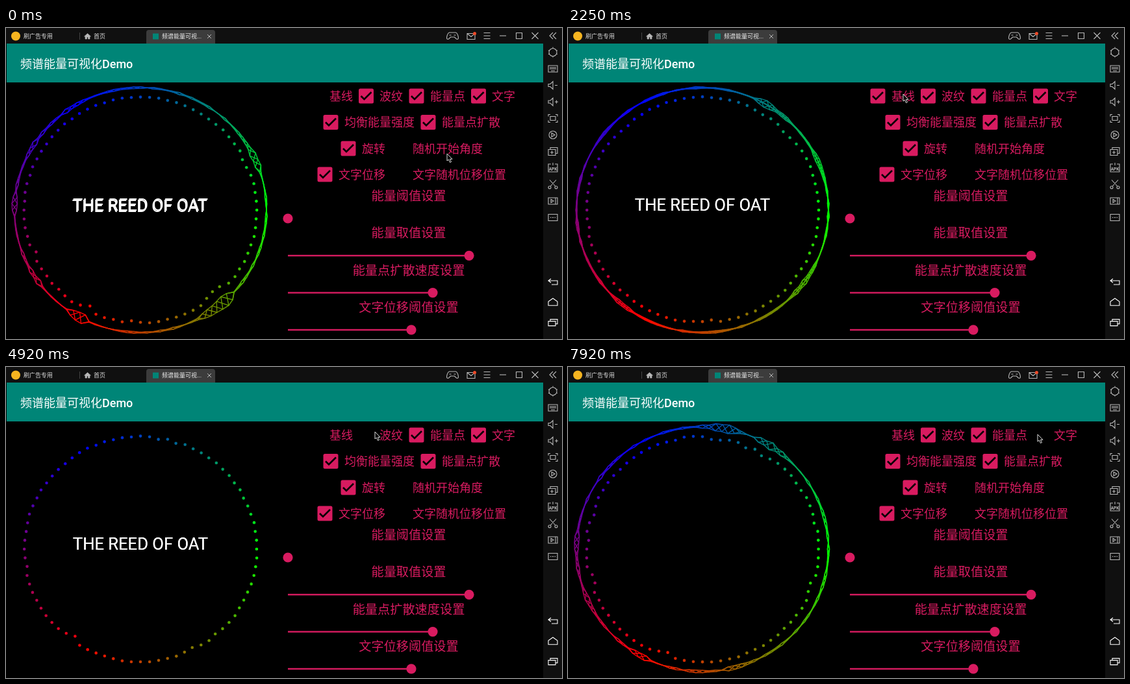
Animation of 856x480 px, one loop 8 s. Source, as an HTML page with a canvas:

```html
<!DOCTYPE html>
<html lang="zh-CN">
<head>
<meta charset="utf-8">
<title>频谱能量可视化Demo</title>
<style>
  html, body { margin: 0; width: 100%; height: 100%; overflow: hidden; background: #000; }
  canvas { display: block; width: 856px; height: 480px; }
</style>
</head>
<body>
<canvas id="stage" width="856" height="480"></canvas>
<script>
const ctx = document.getElementById('stage').getContext('2d');
const LOOP = 8000, STEP = 1000 / 12, BEAT = 1415, FIRST_BEAT = 1160;
const POINTS = 120, DOTS = 80, CX = 207, CY = 281;
const FONT = 'Roboto, "Noto Sans CJK SC", "Noto Sans CJK", sans-serif';
const PINK = '#d81b60', BAR = '#101010', PALE = '#b8b8b8';
const CAPTION = 'THE REED OF OAT';

const spectrum = ctx.createConicGradient(0, CX, CY);
['#0f0', '#f00', '#00f', '#0f0'].forEach((c, i) => spectrum.addColorStop(i / 3, c));

const between = (t, a, b) => t >= a && t < b;
const rnd = (a, b) => {
  const v = Math.sin(a * 12.9898 + b * 78.233) * 43758.5453;
  return v - Math.floor(v);
};

// 1 on each beat, fading quickly afterwards
function beatAt(step) {
  const phase = (step * STEP - FIRST_BEAT) / BEAT;
  return Math.exp(-8 * (phase - Math.floor(phase)));
}

// Sparse clustered peaks over a low hum, strongest near the bottom of the ring
function energy(step, i) {
  const bottom = Math.exp(-(((i / POINTS - .22) / .06) ** 2));
  const burst = rnd(step, Math.floor(i / 3) + 200) ** 7 * (.4 + .6 * rnd(step, i));
  return 1.6 * rnd(step, i + 400) + burst * (8 + 4 * bottom + 4 * beatAt(step));
}

// Peaks push the dots inward, and the dots drift back over the next steps
function dotDepth(step, i) {
  const point = Math.round(i * POINTS / DOTS) % POINTS;
  let depth = 1.5 * rnd(step, i + 600);
  for (let k = 0; k < 3; k++)
    depth = Math.max(depth, 2 * (energy(step - k, point) - 3) * .7 ** k);
  return depth;
}

function text(str, x, y, size, color, weight = 400, align = 'left') {
  ctx.font = `${weight} ${size}px ${FONT}`;
  ctx.textAlign = align;
  ctx.fillStyle = color;
  ctx.fillText(str, x, y);
}

function box(x, y, w, h, color) {
  ctx.fillStyle = color;
  ctx.fillRect(x, y, w, h);
}

function disc(x, y, r, color) {
  ctx.fillStyle = color;
  ctx.beginPath();
  ctx.arc(x, y, r, 0, 7);
  ctx.fill();
}

function icon(x, y, path, color = PALE, width = 1.1, fill) {
  const shape = new Path2D(path);
  ctx.save();
  ctx.translate(x, y);
  if (fill) { ctx.fillStyle = fill; ctx.fill(shape); }
  ctx.strokeStyle = color;
  ctx.lineWidth = width;
  ctx.stroke(shape);
  ctx.restore();
}

function polar(turn, offset) {
  const a = turn * 2 * Math.PI;
  return [CX + (194 + offset) * Math.cos(a), CY + (189 + offset) * Math.sin(a)];
}

function drawWaves(step) {
  const signs = [() => 1, () => -1, i => i % 2 ? 1 : -1, i => i % 2 ? -1 : 1];
  ctx.strokeStyle = spectrum;
  ctx.lineWidth = 1.4;
  for (const sign of signs) {
    ctx.beginPath();
    for (let i = 0; i < POINTS; i++) ctx.lineTo(...polar(i / POINTS, energy(step, i) * sign(i)));
    ctx.closePath();
    ctx.stroke();
  }
}

// Which options are ticked at time t
const options = {
  baseline: t => between(t, 1400, 3500),
  waves: t => !between(t, 4300, 5200),
  dots: t => !between(t, 6050, 7050),
  caption: t => t < 7700
};

function drawRing(t) {
  const step = Math.floor((t + 5) / STEP);
  ctx.save();
  ctx.beginPath();
  ctx.rect(0, 85, 415, 395);
  ctx.clip();
  if (options.baseline(t)) {
    ctx.strokeStyle = spectrum;
    ctx.lineWidth = 2;
    ctx.beginPath();
    ctx.ellipse(CX, CY, 194, 189, 0, 0, 7);
    ctx.stroke();
  }
  if (options.waves(t)) drawWaves(step);
  if (options.dots(t))
    for (let i = 0; i < DOTS; i++) disc(...polar(i / DOTS, -14 - dotDepth(step, i)), 2.3, spectrum);
  if (options.caption(t)) {
    const shift = 8 * beatAt(step);
    text(CAPTION, CX, 282, 25.6, '#fff', 400, 'center');
    text(CAPTION, CX - shift * .65, 282 + shift, 25.6, '#fff', 400, 'center');
  }
  ctx.restore();
}

function checkbox(x, y, label, labelX, on = true, pressed = false) {
  text(label, labelX, y + 6.5, 18, PINK);
  if (!on) return;
  ctx.beginPath();
  if (pressed) {
    ctx.roundRect(x - 10.5, y - 10.5, 21, 21, 1.5);
    ctx.strokeStyle = PINK;
    ctx.lineWidth = 2.4;
    ctx.stroke();
    return;
  }
  ctx.roundRect(x - 11.5, y - 11.5, 23, 23, 2.5);
  ctx.fillStyle = PINK;
  ctx.fill();
  icon(x, y, 'M-8 0L-3 5L8-6', '#000', 2.6);
}

function toggle(x, label, labelX, isOn, t) {
  checkbox(x, 105, label, labelX, isOn(t), t > 100 && !isOn(t - 100));
}

function slider(title, row, knobX) {
  const y = 294 + row * 57.3;
  text(title, 620, y - 28, 19.2, PINK, 400, 'center');
  box(434, y - 1.2, knobX - 434, 2.4, PINK);
  disc(knobX, y, 7.6, PINK);
}

function drawPanel(t) {
  toggle(477, '基线', 498, options.baseline, t);
  toggle(554.5, '波纹', 575, options.waves, t);
  toggle(632, '能量点', 653, options.dots, t);
  toggle(727.5, '文字', 748, options.caption, t);
  checkbox(500, 145.5, '均衡能量强度', 521);
  checkbox(650, 145.5, '能量点扩散', 671);
  checkbox(527, 186, '旋转', 548);
  checkbox(0, 186, '随机开始角度', 626, false);
  checkbox(491, 226, '文字位移', 512);
  checkbox(0, 226, '文字随机位移位置', 626, false);
  slider('能量阈值设置', 0, 434);
  slider('能量取值设置', 1, 713);
  slider('能量点扩散速度设置', 2, 657);
  slider('文字位移阈值设置', 3, 624);
}

const CIRCLE = 'M-6 0A6 6 0 1 1 6 0A6 6 0 1 1-6 0';
const SPEAKER = 'M-7-2H-4L0-6V6L-4 2H-7Z';
const toolIcons = [
  CIRCLE + 'M-7-3L-5-2M7-3L5-2M-7 3L-5 2M7 3L5 2M0-8V-6M0 6V8',
  'M-7-5H7V5H-7ZM-5-2H5M-5 0H5M-3 3H3',
  SPEAKER + 'M3 0H7',
  SPEAKER + 'M3 0H8M5.5-2.5V2.5',
  'M-7-3V-6H-4M4-6H7V-3M7 3V6H4M-4 6H-7V3M-4-3H4V3H-4Z',
  CIRCLE + 'M-2-3L3 0L-2 3Z',
  'M-7-3H4V6H-7ZM-4-3V-6H7V3H4M-4 1.5H1M-1.5-1V4',
  'M-3-6H-7V6H7V-6H3M0-8V-4',
  'M-5-7L4 3M5-7L-4 3M-7 4.5A2 2 0 1 1-3 4.5A2 2 0 1 1-7 4.5M3 4.5A2 2 0 1 1 7 4.5A2 2 0 1 1 3 4.5',
  'M-7-5H7V5H-7ZM4-5V5M-3-2.5L1 0L-3 2.5Z',
  'M-7-5H7V5H-7ZM-4 0H-2.5M-1 0H1M2.5 0H4'
];
const navIcons = ['M-3-5L-7-2L-3 1M-7-2H7V4H-2', 'M-7-1L0-6L7-1V5H-7Z', 'M-7-2H4V5H-7ZM-4-2V-5H7V2H4'];

function drawChrome() {
  box(0, 0, 856, 24, BAR);
  box(827, 24, 29, 456, BAR);
  box(1, 24, 826, 60, '#008577');
  text('频谱能量可视化Demo', 22, 61.5, 18, '#fff', 500);

  disc(15, 12.5, 7, '#f6b420');
  text('刷广告专用', 27, 16, 9, '#ddd');
  box(113, 7, 1, 11, '#444');
  icon(125.5, 13, 'M-5 0L0-4.5L5 0H3.5V4H1V1H-1V4H-3.5V0Z', PALE, .6, PALE);
  text('首页', 135, 16, 9, '#ddd');
  ctx.beginPath();
  ctx.roundRect(216, 3, 106, 21, [4, 4, 0, 0]);
  ctx.fillStyle = '#3c3c3c';
  ctx.fill();
  box(226, 8.5, 9, 9, '#008577');
  text('频谱能量可视...', 240, 16, 9, '#eee');
  icon(313, 13, 'M-3-3L3 3M3-3L-3 3', PALE, 1);

  icon(687.5, 12, 'M-5-5H5Q8-4 9 3Q9 6 6 5L3 2H-3L-6 5Q-9 6-9 3Q-8-4-5-5ZM-5-1H-2M2-1H5');
  icon(716, 12.5, 'M-6-4H6V5H-6ZM-6-4L0 1L6-4');
  disc(721.5, 8.5, 2.5, '#f04a28');
  icon(740.5, 12, 'M-5-4.5H5M-5 0H5M-5 4.5H5');
  icon(765, 12, 'M-5 0H5');
  icon(790, 12, 'M-4.5-4.5H4.5V4.5H-4.5Z');
  icon(814.5, 12, 'M-5-5L5 5M5-5L-5 5');
  icon(842, 12, 'M0-5L-5 0L0 5M5-5L0 0L5 5');
  toolIcons.forEach((path, i) => icon(842, 37.5 + 25.5 * i, path));
  navIcons.forEach((path, i) => icon(842, 392 + 31.3 * i, path, '#fff'));
  text('APK', 842, 219.5, 6.5, PALE, 700, 'center');
}

// [time, x, y]: the pointer eases from each stop to the next
const cursorStops = [
  [0, 679, 194], [200, 679, 194], [1100, 516, 102], [3500, 516, 102], [3900, 568, 100],
  [5300, 568, 100], [5700, 648, 101], [7150, 648, 101], [7600, 723, 104], [LOOP, 723, 104]
];

function drawCursor(t) {
  const k = cursorStops.findIndex(stop => stop[0] > t);
  const [t0, x0, y0] = cursorStops[k - 1], [t1, x1, y1] = cursorStops[k];
  const u = (t - t0) / (t1 - t0), ease = u * u * (3 - 2 * u);
  icon(x0 + (x1 - x0) * ease, y0 + (y1 - y0) * ease,
    'M0 0V11L2.5 9L4.5 13.5L6.5 12.5L4.5 8.3H8Z', '#ddd', 1, '#000');
}

function frame() {
  const t = performance.now() % LOOP;
  box(0, 0, 856, 480, '#000');
  drawChrome();
  drawRing(t);
  drawPanel(t);
  drawCursor(t);
  requestAnimationFrame(frame);
}
frame();
</script>
</body>
</html>
```
